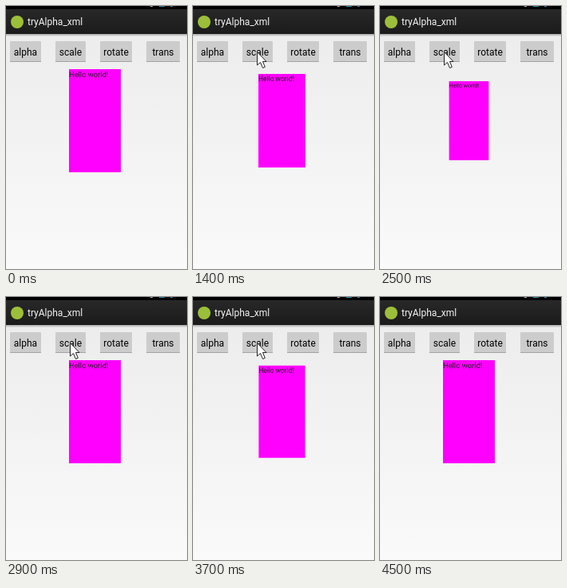
An HTML page for the animation above (5.1 s loop, 227 by 329 pixels).

```html
<!DOCTYPE html>
<html lang="en">
<head>
<meta charset="utf-8">
<title>tryAlpha_xml</title>
<style>
  html, body { margin: 0; width: 100%; height: 100%; overflow: hidden; }
  svg { display: block; width: 100%; height: 100%; font-family: Roboto, sans-serif; font-size: 12px; }
</style>
</head>
<body>
<svg viewBox="0 0 227 329">
  <defs>
    <linearGradient id="page" x2="0" y2="1">
      <stop stop-color="#ebebeb"/><stop offset="1" stop-color="#fafafa"/>
    </linearGradient>
    <linearGradient id="bar" x2="0" y2="1">
      <stop stop-color="#2a2a2a"/><stop offset="1" stop-color="#1b1b1b"/>
    </linearGradient>
    <linearGradient id="shade" x2="0" y2="1">
      <stop stop-color="#a8a8a8"/><stop offset="1" stop-color="#e6e6e6"/>
    </linearGradient>
  </defs>
  <rect width="227" height="329" fill="url(#page)"/>
  <rect y="35" width="227" height="3" fill="url(#shade)"/>
  <rect width="227" height="35" fill="url(#bar)"/>
  <rect width="227" height="4" fill="#000"/>
  <path d="M181 .5h3" stroke="#aaa"/>
  <path d="M192 .5h7M206 .5h3" stroke="#2b87a8"/>
  <circle cx="14" cy="20" r="8" fill="#9cbf3a"/>
  <text x="27" y="24" fill="#f3f3f3">tryAlpha_xml</text>

  <g id="buttons"></g>

  <g id="box">
    <rect x="79" y="79" width="65" height="129" fill="#f0f"/>
    <text x="79" y="89" font-size="9.33" fill="#2a1a2a">Hello world!</text>
  </g>

  <path id="cursor" d="M0 0V16.5L4 13L7 20L9.8 18.8L7 12H11.5Z" fill="#fff" stroke="#222" stroke-linejoin="round"/>
</svg>
<script>
const LOOP = 5100, STEP = 100;
const SCALE_TIME = 700, SCALE_MAX = 1.4;
const clicks = [983, 2129, 3287];
const press = { from: 2100, to: 2200 };
const center = { x: 111.5, y: 143.5 };

// time, x, y of the pointer tip
const pointerPath = [
  [200, 194, 52], [300, 170, 57], [400, 136, 62], [500, 105, 63], [600, 87, 60],
  [700, 80.5, 57.5], [4200, 80.5, 57.5], [4300, 130, 74], [4400, 205, 96]
];

const $ = id => document.getElementById(id);

function addButton(label, x, width, middle) {
  const right = x + width;
  $('buttons').insertAdjacentHTML('beforeend', `<g>
    <rect x="${x - 1.5}" y="42.5" width="${width + 3}" height="29.5" rx="2" fill="#a3d9ef" class="glow" visibility="hidden"/>
    <rect x="${x}" y="44" width="${width}" height="26" rx="1" fill="#cccccc" class="face"/>
    <path d="M${x} 69.5H${right}" stroke="#a4a4a4" class="edge"/>
    <text x="${middle}" y="62" text-anchor="middle" fill="#000">${label}</text></g>`);
  return $('buttons').lastElementChild;
}

addButton('alpha', 5, 39, 24.5);
const scaleButton = addButton('scale', 62, 38, 81);
addButton('rotate', 118, 40, 138);
addButton('trans', 176, 42, 197);

function setPressed(on) {
  const part = name => scaleButton.querySelector('.' + name);
  part('glow').setAttribute('visibility', on ? 'visible' : 'hidden');
  part('face').setAttribute('fill', on ? '#45b8e6' : '#cccccc');
  part('edge').setAttribute('stroke', on ? '#3ba3cf' : '#a4a4a4');
}

// Accelerate, then decelerate from zero to the maximum; snaps back afterwards
function boxScale(time) {
  const start = clicks.find(c => time >= c && time < c + SCALE_TIME);
  if (start === undefined) return 1;
  return SCALE_MAX * (1 - Math.cos(Math.PI * (time - start) / SCALE_TIME)) / 2;
}

function pointerAt(time) {
  const last = pointerPath[pointerPath.length - 1];
  if (time < pointerPath[0][0] || time > last[0]) return null;
  const i = pointerPath.findIndex(p => p[0] >= time);
  const b = pointerPath[i], a = pointerPath[Math.max(0, i - 1)];
  const k = b === a ? 1 : (time - a[0]) / (b[0] - a[0]);
  return [a[1] + (b[1] - a[1]) * k, a[2] + (b[2] - a[2]) * k];
}

function draw(time) {
  const { x, y } = center;
  $('box').setAttribute('transform',
    `translate(${x} ${y}) scale(${boxScale(time)}) translate(${-x} ${-y})`);
  setPressed(time >= press.from && time < press.to);
  const tip = pointerAt(time);
  $('cursor').setAttribute('visibility', tip ? 'visible' : 'hidden');
  if (tip) $('cursor').setAttribute('transform', `translate(${tip})`);
}

const origin = performance.now();
function tick() {
  const time = (performance.now() - origin) % LOOP;
  draw(Math.floor(time / STEP) * STEP);
  requestAnimationFrame(tick);
}
tick();
</script>
</body>
</html>
```
